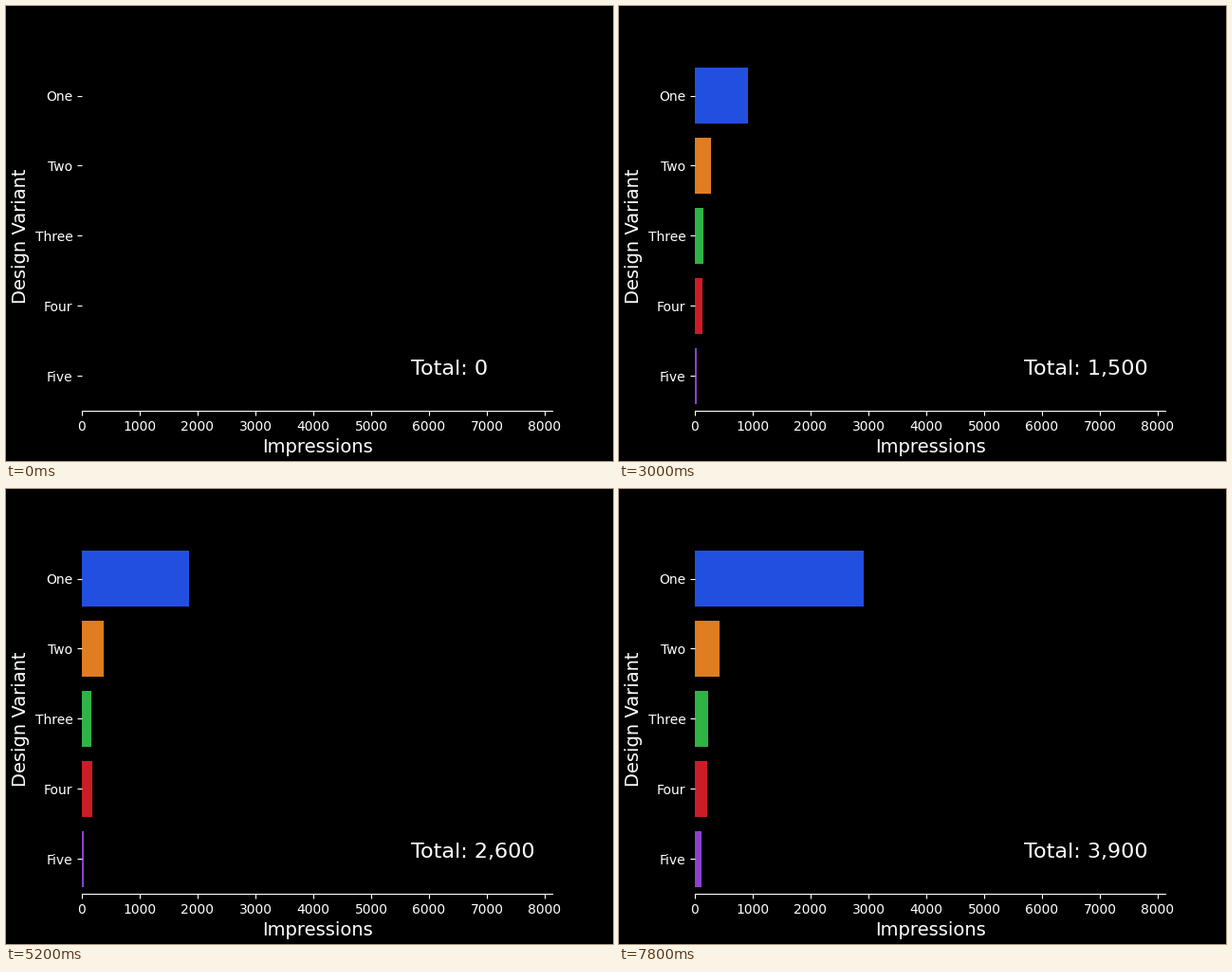
A matplotlib script for the animation above (8000 ms loop, 640x480 px).

```python
import colorsys

import matplotlib.pyplot as plt
from math import exp, tanh
from matplotlib.animation import FuncAnimation
from matplotlib.colors import to_rgb

STEP = 100        # impressions served per frame
FRAMES = 40
NAMES = ["One", "Two", "Three", "Four", "Five"]
BRIGHT = ["#023EFF", "#FF7C00", "#1AC938", "#E8000B", "#8B2BE2"]


def soften(color, amount=0.75):
    h, l, s = colorsys.rgb_to_hls(*to_rgb(color))
    return colorsys.hls_to_rgb(h, l, s * amount)


def saturate(n, top, scale):
    return top * (1 - exp(-n / scale))


def split(n):
    """Share n impressions: the weaker variants level off, One takes the rest."""
    late = max(0, n - 2600)   # Three and Five are explored again from here
    two = saturate(n, 490, 1850)
    three = saturate(n, 168, 700) + 0.048 * late
    four = 215 * tanh(n / 2050)
    five = saturate(n, 14, 100) + 0.0085 * n + 0.052 * late
    return n - two - three - four - five, two, three, four, five


plt.style.use("dark_background")
plt.rcParams["font.family"] = "DejaVu Sans"

fig, ax = plt.subplots(figsize=(6.4, 4.8), dpi=100)
bars = ax.barh(range(5), [0] * 5, height=0.8, linewidth=0,
               color=[soften(c) for c in BRIGHT])
ax.set_xlim(0, 8131.2)
ax.set_ylim(4.5, -0.5)
ax.set_yticks(range(5), NAMES)
ax.set_xlabel("Impressions", fontsize=14)
ax.set_ylabel("Design Variant", fontsize=14)
ax.spines[["left", "top", "right"]].set_visible(False)
label = ax.text(0.7, 0.103, "", fontsize=16, transform=ax.transAxes)


def draw(frame):
    total = frame * STEP
    for bar, count in zip(bars, split(total)):
        bar.set_width(count)
    label.set_text(f"Total: {total:,}")
    return [*bars, label]


anim = FuncAnimation(fig, draw, frames=FRAMES, interval=200,
                     repeat=True, repeat_delay=0)
plt.show()
```
